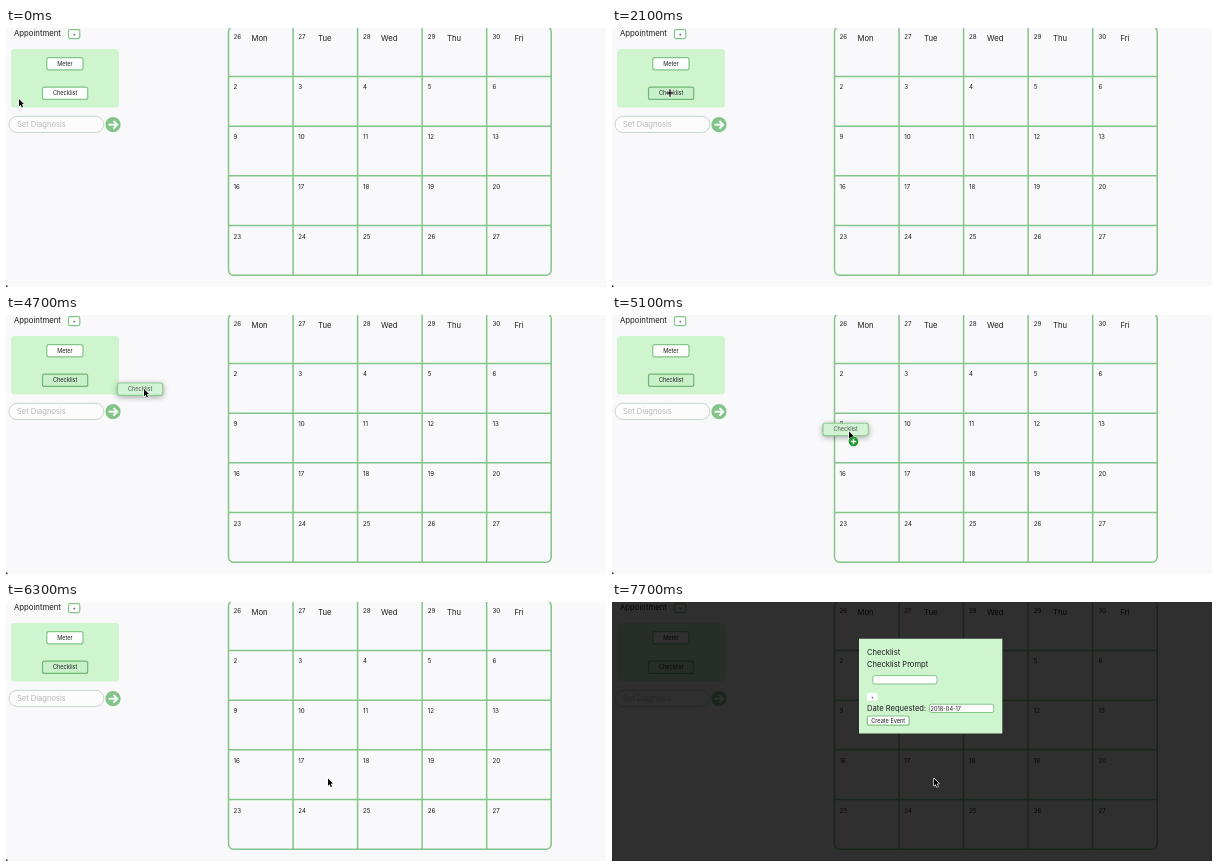
Recreate the animation shown at these times as an HTML page with a canvas. Size 600 by 259 pixels, loop 7900 ms.

```html
<!DOCTYPE html>
<html lang="en">
<head>
<meta charset="utf-8">
<title>Calendar drag and drop</title>
<style>
  html, body { margin: 0; width: 100%; height: 100%; overflow: hidden; background: #f9f9fb; }
  canvas { display: block; width: 600px; height: 259px; }
</style>
</head>
<body>
<canvas id="stage"></canvas>
<script>
const W = 600, H = 259, LOOP = 7900, STEP = 100;
const GREEN = '#83c488', MINT = '#cff5cf', BG = '#f9f9fb', INK = '#1d1d1f';
const canvas = document.getElementById('stage');
const ctx = canvas.getContext('2d');
const ratio = window.devicePixelRatio || 1;
canvas.width = W * ratio;
canvas.height = H * ratio;

// time, x, y of the pointer tip
const pointerPath = [
  [400, 13, 71], [1000, 54, 64], [2000, 58, 65], [4000, 62, 65],
  [4100, 76, 65], [4300, 84, 65.5], [4500, 101, 68], [4700, 138, 74],
  [4800, 172.5, 84.5], [5400, 301.5, 148.5], [5500, 316, 167],
  [5600, 327, 180.5], [6000, 322, 176.5]
];
// time, left, top of the dragged button
const ghostPath = [
  [4100, 50, 58.5], [4300, 58, 59], [4500, 75, 61.5], [4700, 111.5, 68],
  [4800, 146.5, 77.5], [5400, 275.5, 139], [5500, 290, 157.5],
  [5600, 301, 171], [6000, 296, 167]
];

function along(path, t) {
  if (t <= path[0][0]) return path[0].slice(1);
  for (let i = 1; i < path.length; i++) {
    const [t1, x1, y1] = path[i];
    if (t > t1) continue;
    const [t0, x0, y0] = path[i - 1];
    const k = (t - t0) / (t1 - t0);
    return [x0 + (x1 - x0) * k, y0 + (y1 - y0) * k];
  }
  return path[path.length - 1].slice(1);
}

function text(str, x, y, size, color = INK, align = 'left') {
  ctx.font = `${size}px Inter, "Liberation Sans", sans-serif`;
  ctx.textAlign = align;
  ctx.fillStyle = color;
  ctx.fillText(str, x, y);
}

function box(x, y, w, h, r, fill, stroke, line = 1) {
  ctx.beginPath();
  ctx.roundRect(x, y, w, h, r);
  if (fill) {
    ctx.fillStyle = fill;
    ctx.fill();
  }
  if (stroke) {
    ctx.strokeStyle = stroke;
    ctx.lineWidth = line;
    ctx.stroke();
  }
}

function button(label, x, y, w, h, fill = '#fff', border = GREEN) {
  box(x, y, w, h, 2, fill, border, 1.2);
  text(label, x + w / 2, y + h / 2 + 2, 5.6, INK, 'center');
}

function line(x0, y0, x1, y1) {
  ctx.beginPath();
  ctx.moveTo(x0, y0);
  ctx.lineTo(x1, y1);
  ctx.stroke();
}

function drawCalendar() {
  const left = 222.5, right = 545.2, top = -1.3, bottom = 247.3;
  const cw = (right - left) / 5, ch = (bottom - top) / 5;
  box(left, top, right - left, bottom - top, 5, null, GREEN, 1.5);
  for (let i = 1; i < 5; i++) {
    const x = left + cw * i, y = top + ch * i;
    line(x, top, x, bottom);
    line(left, y, right, y);
  }
  const dayX = [245.5, 312, 375, 441, 508.5];
  ['Mon', 'Tue', 'Wed', 'Thu', 'Fri'].forEach((d, i) => text(d, dayX[i], 13, 7.7));
  for (let row = 0; row < 5; row++) {
    for (let col = 0; col < 5; col++) {
      const day = row ? row * 7 - 5 + col : 26 + col;
      text(day, 227.6 + col * 64.7, 11.4 + row * 49.9, 6.2);
    }
  }
}

function drawSidebar(pressed) {
  text('Appointment', 8, 8.3, 7.75);
  box(62.5, 1.6, 11.3, 9, 1.8, '#fff', GREEN, 1.2);
  text('+', 68.1, 7.9, 5, INK, 'center');

  box(5, 21, 108, 58.5, 3.5, MINT);
  button('Meter', 40.8, 29.6, 36.2, 12.2);
  button('Checklist', 36.5, 59.2, 45.2, 12.2, pressed ? '#c8f1ca' : '#fff', pressed ? '#6fb776' : GREEN);

  box(3, 88.3, 94.8, 16.2, 8, '#fcfcfd', '#c9d6cb', 1);
  text('Set Diagnosis', 11, 99.3, 7.55, '#b7b8bc');

  ctx.beginPath();
  ctx.arc(107, 96.7, 7.6, 0, Math.PI * 2);
  ctx.fillStyle = GREEN;
  ctx.fill();
  ctx.strokeStyle = '#fff';
  ctx.lineWidth = 1.9;
  line(102.6, 96.7, 111, 96.7);
  ctx.beginPath();
  ctx.moveTo(107.4, 92.8);
  ctx.lineTo(111.3, 96.7);
  ctx.lineTo(107.4, 100.6);
  ctx.stroke();
}

function drawModal() {
  ctx.fillStyle = 'rgba(0,0,0,.81)';
  ctx.fillRect(0, 0, W, H);
  box(247, 36.8, 143.3, 94.7, 0, MINT);
  text('Checklist', 255, 53.3, 7.6);
  text('Checklist Prompt', 255, 65.2, 7.6);
  box(260.7, 73.6, 64.3, 8.4, 2, '#fff', GREEN);
  box(255, 91, 10.6, 7.6, 0.5, '#fff');
  text('+', 260.3, 96.5, 4.8, INK, 'center');
  text('Date Requested:', 255, 108.6, 7.6);
  box(317.5, 102.2, 64.3, 8.3, 2, '#fff', GREEN);
  text('2018-04-17', 318.6, 108.6, 5.6);
  button('Create Event', 255.3, 114, 41.8, 9.2);
}

function drawGhost([x, y], alpha) {
  ctx.save();
  ctx.globalAlpha = alpha;
  ctx.shadowColor = 'rgba(0,0,0,.4)';
  ctx.shadowBlur = 6 * ratio;
  ctx.shadowOffsetY = 1.5 * ratio;
  box(x, y, 45.3, 12.3, 2, '#d3f3d5');
  ctx.shadowColor = 'transparent';
  button('', x, y, 45.3, 12.3, '#d3f3d5', '#8fcb94');
  text('Checklist', x + 22.6, y + 8.2, 5.6, '#4c574d', 'center');
  ctx.restore();
}

function drawBadge(x, y) {
  ctx.beginPath();
  ctx.arc(x, y, 4.8, 0, Math.PI * 2);
  ctx.fillStyle = '#1f9a2c';
  ctx.fill();
  ctx.strokeStyle = '#fff';
  ctx.lineWidth = 1.4;
  line(x - 2.7, y, x + 2.7, y);
  line(x, y - 2.7, x, y + 2.7);
}

function drawArrow(x, y) {
  const shape = [[0, 0], [0, 7.2], [1.6, 5.8], [2.8, 8.4], [4, 7.9], [2.9, 5.3], [5, 5.1]];
  ctx.beginPath();
  shape.forEach(([dx, dy]) => ctx.lineTo(x + dx, y + dy));
  ctx.closePath();
  ctx.lineJoin = 'round';
  ctx.strokeStyle = '#fff';
  ctx.lineWidth = 1.2;
  ctx.stroke();
  ctx.fillStyle = '#000';
  ctx.fill();
  ctx.lineJoin = 'miter';
}

function drawCross(x, y) {
  for (const [color, width, reach] of [['#fff', 2.6, 4.2], ['#000', 1.3, 3.7]]) {
    ctx.strokeStyle = color;
    ctx.lineWidth = width;
    line(x - reach, y, x + reach, y);
    line(x, y - reach, x, y + reach);
  }
}

function draw(t) {
  ctx.setTransform(ratio, 0, 0, ratio, 0, 0);
  ctx.fillStyle = BG;
  ctx.fillRect(0, 0, W, H);
  drawCalendar();
  drawSidebar(t >= 2000);

  const dragging = t >= 4100 && t < 6300;
  const [x, y] = along(pointerPath, t);
  if (dragging) drawGhost(along(ghostPath, t), Math.min(1, (6300 - t) / 300));
  if (t >= 6400) drawModal();

  ctx.fillStyle = '#222';
  ctx.fillRect(0, 257.5, 1.5, 1.5);

  if (t >= 2000 && t < 4100) drawCross(58, 65);
  else if (t < 2000) drawArrow(...along(pointerPath, Math.min(t, 1000)));
  else drawArrow(x, y);
  if (dragging && t < 6000 && x > 222) drawBadge(x + 4.5, y + 10);
}

const start = performance.now();
function tick() {
  const t = (performance.now() - start) % LOOP;
  draw(Math.floor(t / STEP) * STEP);
  requestAnimationFrame(tick);
}
tick();
</script>
</body>
</html>
```
